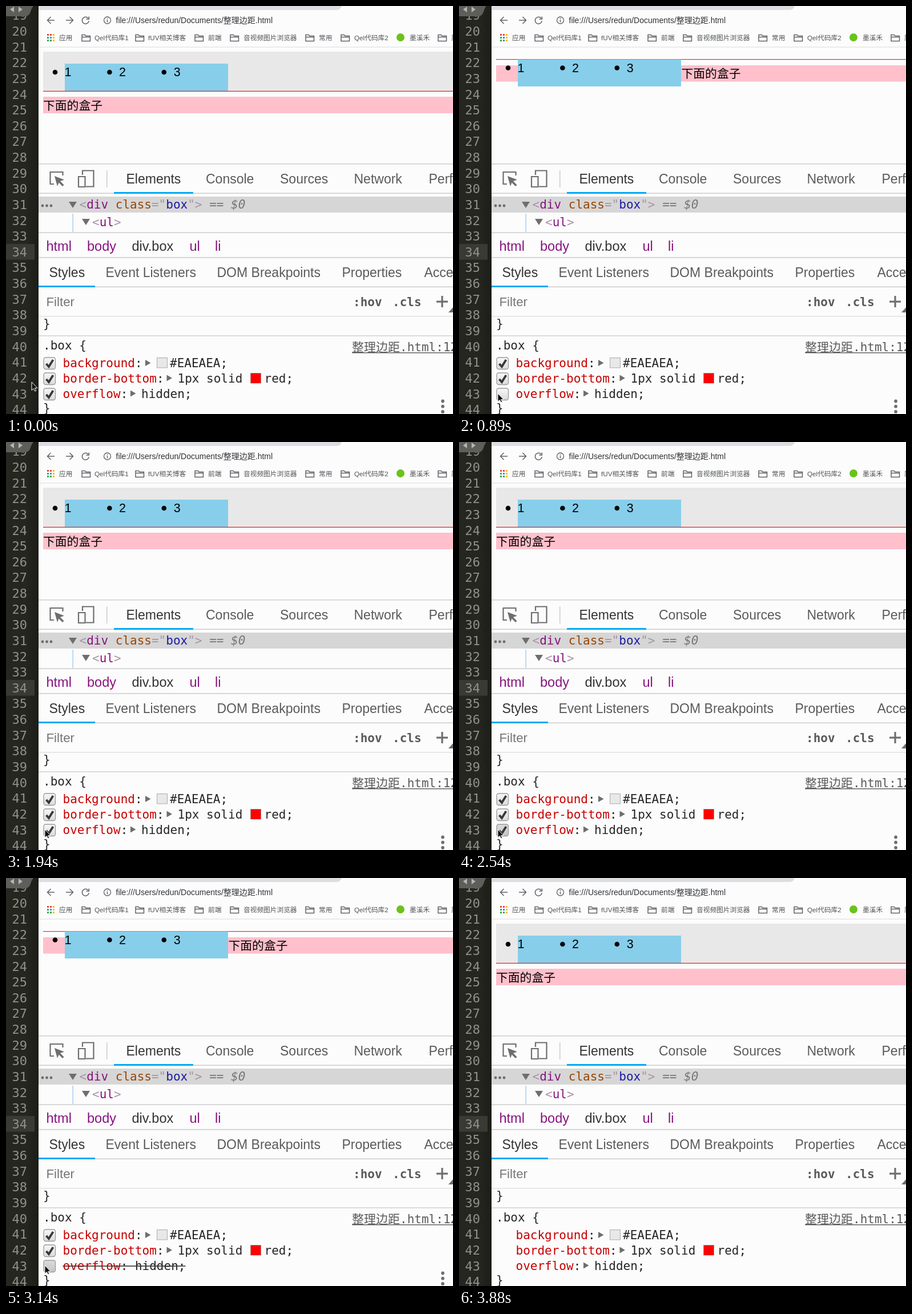
Write an HTML page that moves like this. It is 783 by 715 pixels and loops after 4.18 s.

```html
<!DOCTYPE html>
<html lang="zh-CN">
<head>
<meta charset="utf-8">
<title>Float layout demo</title>
<style>
html, body { margin: 0; width: 100%; height: 100%; overflow: hidden; background: #fcfcfc; }
svg { display: block; width: 783px; height: 715px; }
text { white-space: pre; font-family: "Liberation Sans", "Noto Sans CJK SC", "Noto Sans CJK", sans-serif; }
.num { font: 22px "DejaVu Sans Mono", monospace; fill: #90918b; }
.code { font: 21px "DejaVu Sans Mono", "Noto Sans CJK SC", "Noto Sans CJK", monospace; fill: #252525; }
.bold { font-weight: bold; fill: #5a5a5a; }
.link { fill: #5a5a5a; }
.url { font-size: 14px; fill: #303236; }
.mark { font-size: 11.7px; fill: #505357; }
.tab { font-size: 23px; fill: #5a5a5a; }
.crumb { font-size: 23.5px; fill: #881280; }
.active { fill: #333; }
.filter { font-size: 22.3px; fill: #757575; }
.page { font-size: 21.5px; fill: #000; }
.cjk { font-size: 20.8px; }
.tag { fill: #881280; }
.punct { fill: #a894a6; }
.attr { fill: #994500; }
.val { fill: #1a1aa6; }
.dim { fill: #777; }
.prop { fill: #c80000; }
.line { fill: none; stroke: #5f6368; stroke-width: 1.5; }
.tool { fill: none; stroke: #6e6e6e; stroke-width: 2.2; }
.grey { fill: #6e6e6e; }
</style>
</head>
<body>
<svg id="stage" viewBox="0 0 783 715" xmlns="http://www.w3.org/2000/svg"></svg>
<script>
const rect = (x, y, w, h, fill, more = '') =>
  `<rect x="${x}" y="${y}" width="${w}" height="${h}" fill="${fill}" ${more}/>`;
const text = (x, y, cls, str) => `<text x="${x}" y="${y}" class="${cls}">${str}</text>`;
const dot = (x, y, r, fill) => `<circle cx="${x}" cy="${y}" r="${r}" fill="${fill}"/>`;
const path = (d, cls) => `<path d="${d}" class="${cls}"/>`;
const span = (cls, str) => `<tspan class="${cls}">${str}</tspan>`;
const group = (id, body) => `<g id="${id}">${body}</g>`;
const down = (x, y) => path(`M${x} ${y}h14l-7 11z`, 'grey');
const right = (x, y) => path(`M${x} ${y - 5.5}l9.5 5.5l-9.5 5.5z`, 'grey');
const folder = x => path(`M${x} 50.5h5l2 2h7.5v9h-14.5zM${x} 54.5h14.5`, 'line');
const range = (n, fn) => Array.from({ length: n }, (_, i) => fn(i)).join('');

function editor() {
  return rect(0, 0, 57, 715, 'url(#gutter)') +
    rect(0, 417, 50, 27.5, '#3a3a34') +
    range(26, i => text(10.5, 24.4 + i * 27.63, 'num', 19 + i)) +
    '<path d="M0 0H48Q45 3 43 10T34 18H0z" fill="#5e5e5b"/>' +
    '<path d="M14 1v10l-7-5zM22 1v10l7-5z" fill="#b5b5b2"/>';
}

function browser() {
  const dots = ['#ea4335', '#ea4335', '#fbbc05', '#34a853', '#4285f4', '#fbbc05', '#34a853', '#34a853', '#fbbc05'];
  const marks = [[93, '应用'], [155, 'Qel代码库1'], [249, 'fUV相关博客'], [354, '前端'],
    [416, '音视频图片浏览器'], [548, '常用'], [610, 'Qel代码库2'], [707, '墨溪禾'], [780, '简']];
  return rect(57, 0, 726, 715, '#fcfcfc') +
    '<path d="M57 0H588Q586 7 579 7H57z" fill="#dcdde0"/>' +
    path('M85 25H72.5M78.5 19l-6 6l6 6', 'line') +
    path('M105 25h12.5M111.5 19l6 6l-6 6', 'line') +
    path('M144 21.5A6 6 0 1 0 145.3 26M145.3 18.5V23H140.5', 'line') +
    '<circle cx="177.5" cy="25" r="6" fill="none" stroke="#5f6368" stroke-width="1.3"/>' +
    rect(176.8, 24, 1.4, 4.5, '#5f6368') + rect(176.8, 21.5, 1.4, 1.5, '#5f6368') +
    text(192.5, 30, 'url', 'file:///Users/redun/Documents/整理边距.html') +
    dots.map((c, i) => rect(72 + i % 3 * 5, 49 + Math.floor(i / 3) * 5, 3, 3, c)).join('') +
    [133, 227, 331, 393, 525, 587, 757].map(folder).join('') +
    dot(691, 55, 7, '#6cc21d') +
    marks.map(([x, s]) => text(x, 59.5, 'mark', s)).join('') +
    rect(57, 71.5, 726, 1, '#dedede');
}

const items = (dy, height) => rect(103, 101 + dy, 286, height, '#87ceeb') +
  range(3, i => dot(86 + i * 95.4, 116 + dy, 4.3, '#000') +
    text(102.5 + i * 95.6, 123.3 + dy, 'page', i + 1));

const contained = () => rect(65, 80, 718, 69, '#e8e8e8') + items(0, 48) +
  rect(65, 148.8, 718, 1.2, '#e02020') +
  rect(65, 159, 718, 29, '#ffc0cb') + text(65, 181.5, 'page cjk', '下面的盒子');

const collapsed = () => rect(65, 104, 718, 28.5, '#ffc0cb') +
  rect(65, 93, 718, 1.2, '#f03030') + items(-7.5, 47.5) +
  text(389.5, 126, 'page cjk', '下面的盒子');

function tools() {
  const top = [[210.5, 'Elements'], [350, 'Console'], [480, 'Sources'], [609.5, 'Network'], [740.5, 'Performance']];
  const side = [[75.5, 'Styles'], [174.5, 'Event Listeners'], [369.5, 'DOM Breakpoints'], [588.5, 'Properties'], [732.5, 'Accessibility']];
  const crumbs = [[70.5, 'html'], [142, 'body'], [220.5, 'div.box'], [321.5, 'ul'], [366, 'li']];
  const tabs = (list, y) => list.map(([x, s], i) => text(x, y, i ? 'tab' : 'tab active', s)).join('');
  const rule = (y, c = '#cdcdcd') => rect(57, y, 726, 1.5, c);
  return rule(276) + rule(327.5) + rule(396.5) + rule(440) + rule(491.5) +
    rule(543, '#e2e2e2') + rect(57, 577, 726, 2, '#dcdcdc') +
    path('M84 312H77.5V291H99.5V297', 'tool') +
    path('M85 298l17 6.5l-7 2.5l6.5 6.5l-2.5 2.5l-6.5-6.5l-2.5 6.5z', 'grey') +
    path('M134 296V288.5H153.5V316.5H140M127 299H138.5V317H127z', 'tool') +
    rect(176, 288, 1.5, 30, '#ccc') +
    tabs(top, 311) + rect(189, 326, 139, 3, '#03a9f4') +
    rect(57, 334, 726, 28, '#d6d6d6') +
    range(3, i => dot(64 + i * 7.5, 350, 2.4, '#6e6e6e')) + down(110, 343) +
    text(128.5, 355, 'code', span('punct', '&lt;') + span('tag', 'div') + ' ' + span('attr', 'class') +
      span('punct', '="') + span('val', 'box') + span('punct', '"&gt;') +
      span('dim', ' == <tspan font-style="italic">$0</tspan>')) +
    rect(116.5, 364, 1.3, 32, '#9cc6ef') + down(133, 373) +
    text(151, 385.5, 'code', span('punct', '&lt;') + span('tag', 'ul') + span('punct', '&gt;')) +
    crumbs.map(([x, s]) => text(x, 428.5, s === 'div.box' ? 'crumb active' : 'crumb', s)).join('') +
    tabs(side, 475) + rect(57, 490, 99, 3, '#03a9f4') +
    text(70.5, 526, 'filter', 'Filter') +
    text(608, 525.5, 'code bold', ':hov') + text(677, 525.5, 'code bold', '.cls') +
    rect(754, 516.5, 20, 3.2, '#6e6e6e') + rect(762.4, 508, 3.2, 20, '#6e6e6e') +
    path('M783 528v9h-8z', 'grey');
}

function styles() {
  const prop = (y, name) => text(99.5, y, 'code', span('prop', name) + ':');
  const swatch = (x, y, c) => rect(x, y, 18, 17.5, c, 'stroke="#808080" stroke-opacity=".6"');
  return text(65, 563.5, 'code', '}') + text(65, 601.5, 'code', '.box {') +
    text(606, 605, 'code link', '整理边距.html:12') + rect(606, 607, 177, 1.4, '#5a5a5a') +
    prop(632.5, 'background') + right(244, 625.5) + swatch(264.5, 616.5, '#e8e8e8') + text(287, 632.5, 'code', '#EAEAEA;') +
    prop(659.5, 'border-bottom') + right(281.5, 652) + text(300.5, 659.5, 'code', '1px solid') +
    swatch(428.5, 643.5, '#f00') + text(452.5, 659.5, 'code', 'red;') +
    group('live', prop(686.5, 'overflow') + right(218, 679) + text(237, 686.5, 'code', 'hidden;')) +
    group('struck', text(99.5, 686.5, 'code', span('prop', 'overflow') + ': hidden;') +
      rect(99.5, 679.3, 215, 1.6, '#333')) +
    text(65, 711.5, 'code', '}');
}

function controls() {
  const box = (y, id) => rect(66, y, 20.5, 20.5, 'url(#face)', `rx="3.5" stroke="#9a9a9a" stroke-width="1.3" id="box${id}"`) +
    `<path id="tick${id}" d="M70.5 ${y + 11}l4.5 5l7.5-12" fill="none" stroke="#383838" stroke-width="3.8"/>`;
  return [616, 643, 670].map(box).join('') +
    range(3, i => dot(765, 692.5 + i * 9.2, 2.9, '#6e6e6e'));
}

const stage = document.getElementById('stage');
stage.innerHTML = `<defs>
  <linearGradient id="gutter"><stop offset=".6" stop-color="#25261f"/><stop offset="1" stop-color="#1c1d18"/></linearGradient>
  <linearGradient id="face" x2="0" y2="1"><stop stop-color="#f8f8f8"/><stop offset="1" stop-color="#dadada"/></linearGradient>
  <linearGradient id="pressed" x2="0" y2="1"><stop stop-color="#dcdcdc"/><stop offset="1" stop-color="#c4c4c4"/></linearGradient>
  </defs>` + browser() + group('contained', contained()) + group('collapsed', collapsed()) +
  tools() + styles() + group('controls', controls()) + editor() +
  group('cursor', '<path d="M1 1V15.5L4.3 12.3L6.6 17L8.8 16L6.6 11.5H11z" fill="#0a0a0a" stroke="#fff" stroke-linejoin="round"/>');

const el = id => document.getElementById(id);
const show = (id, on) => el(id).setAttribute('visibility', on ? 'visible' : 'hidden');

// Each step changes only the listed values; the others carry over.
const LOOP = 4180;
const changes = [
  [0, { checked: true, hover: true, struck: false, down: false, at: [44, 658] }],
  [150, { hover: false, at: [51, 668] }],
  [300, { hover: true, at: [63, 677] }],
  [450, { at: [65, 677] }],
  [590, { at: [67, 678] }],
  [890, { checked: false }],
  [1040, { struck: true }],
  [1790, { down: true }],
  [1940, { checked: true, struck: false, down: false }],
  [2540, { down: true }],
  [2690, { checked: false, struck: true, down: false }],
  [3140, { down: true }],
  [3280, { checked: true, struck: false, down: false }],
  [3430, { at: [489, 704] }],
  [3580, { at: [583, 708] }],
  [3730, { at: [661, 708] }],
  [3880, { hover: false, at: null }]
];
let carry = {};
const steps = changes.map(([time, change]) => ({ time, ...(carry = { ...carry, ...change }) }));

let current;
function render(now) {
  const step = steps.findLast(s => s.time <= now % LOOP);
  if (step === current) return;
  current = step;
  show('contained', step.checked);
  show('collapsed', !step.checked);
  show('live', !step.struck);
  show('struck', step.struck);
  el('controls').style.display = step.hover ? '' : 'none';
  show('tick2', step.checked);
  el('box2').setAttribute('fill', step.down ? 'url(#pressed)' : 'url(#face)');
  show('cursor', step.at);
  if (step.at) el('cursor').setAttribute('transform', `translate(${step.at})`);
}
const start = performance.now();
function frame() {
  render(performance.now() - start);
  requestAnimationFrame(frame);
}
frame();
</script>
</body>
</html>
```
